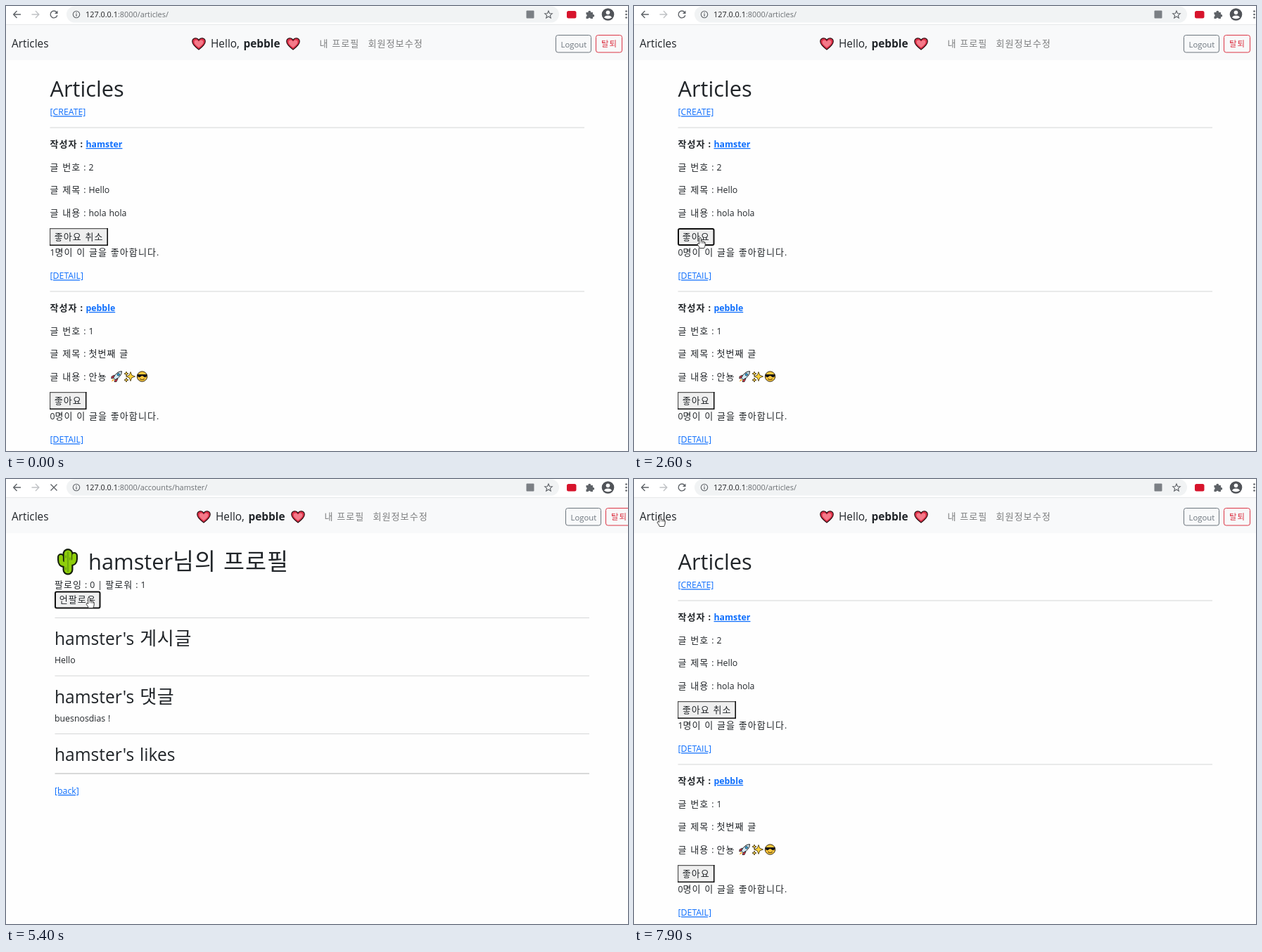
An HTML page that plays this animation: 884 px wide and 633 px high, repeating every 8 s.

```html
<!DOCTYPE html>
<html lang="ko">
<head>
<meta charset="utf-8">
<title>Articles</title>
<style>
  html, body { margin: 0; width: 100%; height: 100%; overflow: hidden; background: #fefefe; }
  svg { display: block; width: 884px; height: 633px; }
  text { font-family: "Open Sans", "Noto Sans CJK KR", "Noto Sans CJK JP", sans-serif; white-space: pre; fill: #212529; }
  .ko { font-family: "Noto Sans CJK KR", "Noto Sans CJK JP", sans-serif; }
  .thin { font-weight: 300; }
  .b { font-weight: 700; }
  .link { fill: #0d6efd; text-decoration: underline; }
  .hover { fill: #0a58ca; }
  .muted { fill: #7c7d7e; }
  .gray { fill: #6c757d; }
  .red { fill: #dc3545; }
  .url { fill: #202124; }
  .path { fill: #6b6f73; }
  .icon { fill: none; stroke: #5f6368; stroke-width: 1.4; }
</style>
</head>
<body>
<svg id="stage" viewBox="0 0 884 633"></svg>
<script>
const LOOP = 8000, STEP = 100;
const ME = 'pebble', OTHER = 'hamster';
const BODY = 13.04, NAV = 16.3, H1 = 32.6, H2 = 26;

// time, tip x, tip y, shape
const PATH = [
  [100, 857, 178, 'arrow'], [200, 535, 378, 'arrow'], [300, 203, 447, 'arrow'],
  [400, 110, 415, 'arrow'], [500, 109, 383, 'hand'], [600, 111, 350, 'arrow'],
  [700, 112, 332, 'hand'], [900, 111, 326, 'hand'], [1400, 111, 326, 'arrow'],
  [1600, 111, 326, 'hand'], [1800, 111, 326, 'hand'], [1900, 112, 342, 'arrow'],
  [2100, 114, 367, 'arrow'], [2300, 92, 364, 'arrow'], [2400, 93, 340, 'hand'],
  [2500, 94, 329, 'hand'], [3100, 94, 329, 'hand'], [3200, 95, 336, 'hand'],
  [3300, 122, 305, 'arrow'], [3400, 145, 265, 'arrow'], [3500, 145, 238, 'arrow'],
  [3600, 140, 217, 'arrow'], [3700, 139, 205, 'arrow'], [3800, 138, 199, 'hand'],
  [4000, 137, 197, 'hand'], [4400, 137, 197, 'hand'], [4500, 139, 200, 'arrow'],
  [4700, 177, 246, 'arrow'], [4800, 190, 287, 'arrow'], [4900, 176, 258, 'arrow'],
  [5000, 142, 200, 'arrow'], [5100, 122, 172, 'hand'], [5300, 118, 168, 'hand'],
  [6700, 118, 168, 'hand'], [6800, 128, 153, 'beam'], [6900, 108, 126, 'arrow'],
  [7100, 52, 78, 'arrow'], [7200, 38, 61, 'hand'], [7400, 30, 52, 'hand'],
  [7700, 30, 52, 'hand'], [7800, 34, 52, 'hand'], [7900, 37, 52, 'hand']
];
const LOADING = [[1100, 1600], [2700, 2900], [4100, 4200], [5400, 5500], [6300, 6500], [7500, 7600]];
const ICON_OFF = [[1400, 1600], [2800, 2900]];
const LIKE_FOCUS = [[1000, 1600], [2600, 2900]];
const FOLLOW_FOCUS = [[5300, 5500], [6200, 6400]];
const UNLIKED = [[1600, 2900]], UNFOLLOWED = [[5500, 6400]], PROFILE = [[4200, 7600]];
const DETAIL_HOVER = [[500, 600]], AUTHOR_HOVER = [[3800, 4200]];

const within = (t, spans) => spans.some(([a, b]) => t >= a && t < b);
const at = (x, y, s) => `<g transform="translate(${x} ${y})">${s}</g>`;
const path = (d, attrs = '') => `<path d="${d}" ${attrs}/>`;
const rect = (x, y, w, h, attrs) => `<rect x="${x}" y="${y}" width="${w}" height="${h}" ${attrs}/>`;
const circle = (x, y, r, attrs) => `<circle cx="${x}" cy="${y}" r="${r}" ${attrs}/>`;
const rule = (x, y, color = '#d6d7d8') => rect(x, y, 759.5, 1, `fill="${color}"`);

// Hangul and Latin runs take slightly different sizes and spacing.
function text(x, y, str, size = BODY, cls = '') {
  const big = size > 20;
  const runs = str.match(/[가-힣]+(?: [가-힣]+)*|[^가-힣]+/g).map(run =>
    /[가-힣]/.test(run)
      ? `<tspan class="ko${big ? ' thin' : ''}" font-size="${size}" letter-spacing="${size * (big ? 0.03 : 0.08)}">${run}</tspan>`
      : `<tspan font-size="${size * 0.945}" word-spacing="${size * 0.06}">${run}</tspan>`);
  return `<text x="${x}" y="${y}" class="${cls}">${runs.join('')}</text>`;
}

function button(x, y, w, label, focused) {
  const box = focused
    ? rect(x + 1, y + 1, w - 2, 23, 'rx="2" fill="#efefef" stroke="#101010" stroke-width="2"')
    : rect(x, y, w, 25, 'fill="#efefef"') +
      path(`M${x + .6} ${y + 25}V${y + .6}H${x + w}`, 'fill="none" stroke="#555" stroke-width="1.2"') +
      path(`M${x} ${y + 24.2}H${x + w - .8}V${y}`, 'fill="none" stroke="#111" stroke-width="1.6"');
  return box + text(x + 6.8, y + 16.8, label);
}

const heart = x => at(x, 45,
  path('M10 17C4 12.5 .8 9.5 .8 5.5C.8 .3 7.5 -1 10 3.6C12.5 -1 19.2 .3 19.2 5.5C19.2 9.5 16 12.5 10 17Z',
    'fill="#df3048" stroke="#2a1316" stroke-width="1.2"') +
  path('M10 14C6 11 3.6 8.8 3.6 6.2C3.6 3 8.2 2.400 10 5.8C11.8 2.4 16.4 3 16.4 6.2C16.4 8.8 14 11 10 14Z',
    'fill="#f47a89"'));

function cactus() {
  const arms = 'M78 111V115Q78 121 83 121H88M97 109V114Q97 119 92 119H88';
  const layer = (color, trunk, arm) =>
    path('M88 106.5V129', `stroke="${color}" stroke-width="${trunk}"`) +
    path(arms, `stroke="${color}" stroke-width="${arm}"`);
  return `<g fill="none" stroke-linecap="round">${layer('#15200c', 15, 10)}${layer('#8fce0a', 10.6, 5.8)}` +
    path('M88 104V132M85 109V112M91 112V115M85 126V129', 'stroke="#4d8610" stroke-width="1"') + '</g>';
}

const rocket = () => at(149, 519,
  path('M5 6L1 8 .8 11 4.5 10ZM10 11L8 15.5 5 15.5 6.5 11.5Z', 'fill="#d8344b" stroke="#222" stroke-width=".8"') +
  path('M3 11.5L.7 15.5 5 13Z', 'fill="#f7a51c"') +
  path('M15.5 .6Q8 .8 3.5 10L6.2 12.6Q15.5 8 15.5 .6Z', 'fill="#cfe8f5" stroke="#222"') +
  circle(10.8, 5.3, 1.8, 'fill="#2b9fd8" stroke="#222" stroke-width=".7"'));

function sparkles() {
  const star = (x, y, r) => {
    const k = r * 0.28;
    return path(`M${x} ${y - r}L${x + k} ${y - k} ${x + r} ${y} ${x + k} ${y + k} ${x} ${y + r} ${x - k} ${y + k} ${x - r} ${y} ${x - k} ${y - k}Z`,
      'fill="#ffd23a" stroke="#3a2c08" stroke-width=".8"');
  };
  return star(177, 527, 6.5) + star(171, 523, 3) + star(171, 532, 3);
}

const coolFace = () => at(193.5, 527,
  circle(0, 0, 7.2, 'fill="#ffc83d" stroke="#30240a"') +
  path('M-7 -3H7L6 .5Q3.5 2.5 1 -.8H-1Q-3.5 2.5 -6 .5Z', 'fill="#161616"') +
  path('M-3.5 3.5Q0 5.6 3.5 3.5', 'fill="none" stroke="#30240a"'));

function toolbar(t, onProfile) {
  const reload = within(t, LOADING)
    ? path('M63.5 7.5L72.5 16.5M72.5 7.5L63.5 16.5', 'class="icon"')
    : path('M72 9A4.900 4.9 0 1 0 72.8 13.2', 'class="icon"') + path('M73.5 6.5V11H69Z', 'fill="#5f6368"');
  const puzzle = path('M824.5 9H827.5A1.8 1.8 0 1 1 831 9H834V12A1.8 1.8 0 1 1 834 15.5V18H830.8A1.7 1.7 0 0 0 827.5 18H824.5V15A1.7 1.7 0 0 0 824.5 11.8Z', 'fill="#5f6368"');
  const star = path('M771 7L772.5 10.5 776.3 10.8 773.4 13.3 774.3 17 771 15 767.7 17 768.6 13.3 765.7 10.8 769.5 10.5Z', 'class="icon" style="stroke-width:1.1"');
  return rect(0, 0, 884, 27, 'fill="#fff"') +
    rect(86, 0.5, 700, 23, 'rx="11.5" fill="#f1f3f4"') +
    rect(0, 26, 884, 1, 'fill="#e6e8ea"') +
    path('M21 12H11M15.5 7L10.7 12 15.5 17', 'class="icon"') +
    path('M36.5 12H46.5M42 7L46.8 12 42 17', 'class="icon" style="stroke:#c0c2c5"') +
    reload +
    circle(100, 12, 4.7, 'class="icon" style="stroke-width:1.1"') +
    path('M100 11.3V14.8M100 9V10.3', 'class="icon" style="stroke-width:1.2"') +
    `<text x="113" y="16.2" font-size="10.87" class="path"><tspan class="url">127.0.0.1</tspan>:8000/${onProfile ? `accounts/${OTHER}/` : 'articles/'}</text>` +
    (within(t, ICON_OFF) ? '' : rect(739.5, 6.5, 11, 11, 'rx="1" fill="#7b7f84"')) +
    star + rect(797, 7, 13.5, 10.5, 'rx="2.5" fill="#d7142c"') + puzzle +
    circle(855.5, 12, 8.8, 'fill="#505358"') +
    circle(855.5, 9.2, 2.8, 'fill="#fff"') +
    path('M850 16.5Q851 13.5 855.5 13.5T861 16.5Q855.5 20 850 16.5Z', 'fill="#fff"') +
    [7.5, 12, 16.5].map(y => circle(881.5, y, 1.3, 'fill="#5f6368"')).join('');
}

function navbar(dx) {
  const outline = (x, w, color) =>
    rect(x + dx * 2 + .5, 41.5, w, 24.5, `rx="3" fill="none" stroke="${color}"`);
  return rect(0, 27, 884, 50, 'fill="#f8f9fa"') +
    text(8, 59, 'Articles', NAV) +
    heart(264 + dx) + text(291 + dx, 59, 'Hello,', NAV) +
    text(337.5 + dx, 59, ME, NAV, 'b') + heart(398 + dx) +
    text(445.5 + dx, 58, '내 프로필', BODY, 'muted') +
    text(514.5 + dx, 58, '회원정보수정', BODY, 'muted') +
    outline(781, 50, '#6c757d') + text(788.5 + dx * 2, 58.5, 'Logout', 12, 'gray') +
    outline(838, 37, '#dc3545') + text(846 + dx * 2, 58, '탈퇴', 11.4, 'red');
}

function post(y, { author, id, title, body, liked, focused, hover }) {
  const link = name => 'link' + (hover === name ? ' hover' : '');
  return text(62.5, y + 201, '작성자 :', BODY, 'b') +
    text(113.5, y + 201, author, BODY, 'b ' + link('author')) +
    text(62.5, y + 233.5, `글 번호 : ${id}`) +
    text(62.5, y + 266, `글 제목 : ${title}`) +
    text(62.5, y + 298.5, `글 내용 : ${body}`) +
    button(62, y + 316, liked ? 83 : 52.5, liked ? '좋아요 취소' : '좋아요', focused) +
    text(62.5, y + 355.3, `${liked ? 1 : 0}명이 이 글을 좋아합니다.`) +
    text(62.5, y + 388.3, '[DETAIL]', BODY, link('detail'));
}

function articles(t) {
  const hover = within(t, DETAIL_HOVER) ? 'detail' : within(t, AUTHOR_HOVER) ? 'author' : '';
  return text(62.5, 129, 'Articles', H1) +
    text(62.5, 155.3, '[CREATE]', BODY, 'link') +
    rule(62.5, 172.5) +
    post(0, {
      author: OTHER, id: 2, title: 'Hello', body: 'hola hola',
      liked: !within(t, UNLIKED), focused: within(t, LIKE_FOCUS), hover
    }) +
    rule(62.5, 405.5) +
    post(233, { author: ME, id: 1, title: '첫번째 글', body: '안뇽' }) +
    rocket() + sparkles() + coolFace();
}

function profile(t) {
  const following = !within(t, UNFOLLOWED);
  return cactus() +
    text(117, 129, `${OTHER}님의 프로필`, H1) +
    text(69, 154.5, `팔로잉 : 0 | 팔로워 : ${following ? 1 : 0}`) +
    button(69, 159.5, following ? 65.5 : 52.5, following ? '언팔로우' : '팔로우', within(t, FOLLOW_FOCUS)) +
    rule(69.5, 197) + text(69, 236, `${OTHER}'s 게시글`, H2) + text(69, 262.3, 'Hello') +
    rule(69.5, 279.5) + text(69, 318.5, `${OTHER}'s 댓글`, H2) + text(69, 344.8, 'buesnosdias !') +
    rule(69.5, 362) + text(69, 401, `${OTHER}'s likes`, H2) +
    rule(69.5, 418.5, '#b4b5b6') + text(69, 448, '[back]', BODY, 'link');
}

const CURSORS = {
  arrow: path('M.5 0V11.5L3 9.2 4.8 13 6.5 12.2 4.8 8.5H8Z', 'fill="#fff" stroke="#222" stroke-width=".9"'),
  hand: path('M-1.3 9.5V1.2Q0 -.6 1.3 1.2V5.5Q2.7 4.5 3.6 6Q5 5.3 5.7 6.8Q7.2 6.5 7.2 8V11Q7 13.5 5.6 15.5H-.6Q-1.5 13 -3.8 10.3Q-4 8.3 -2.3 8.7Z',
    'fill="#fff" stroke="#222" stroke-width=".9"') + path('M1.3 5.5V8.5M3.6 6V8.8M5.7 7V9', 'stroke="#222" stroke-width=".7"'),
  beam: path('M-2.5 -5.5H-.7L0 -5 .7 -5.5H2.5M0 -5V5M-2.5 5.5H-.7L0 5 .7 5.5H2.5', 'fill="none" stroke="#222"')
};

function cursor(t) {
  if (t < PATH[0][0]) return '';
  const i = PATH.findLastIndex(k => k[0] <= t);
  const [t0, x0, y0, shape] = PATH[i];
  const [t1, x1, y1] = PATH[i + 1] || [LOOP, x0, y0];
  const mix = (a, b) => Math.round(a + (b - a) * (t - t0) / (t1 - t0));
  return at(mix(x0, x1), mix(y0, y1), CURSORS[shape]);
}

const stage = document.getElementById('stage');
let shown = -1;

function draw(now) {
  const t = Math.floor((now % LOOP) / STEP) * STEP;
  if (t === shown) return;
  shown = t;
  const onProfile = within(t, PROFILE);
  stage.innerHTML = toolbar(t, onProfile) + navbar(onProfile ? 7 : 0) +
    (onProfile ? profile(t) : articles(t)) + cursor(t);
}

draw(0);
let start;
requestAnimationFrame(function tick(now) {
  start ??= now;
  draw(now - start);
  requestAnimationFrame(tick);
});
</script>
</body>
</html>
```
